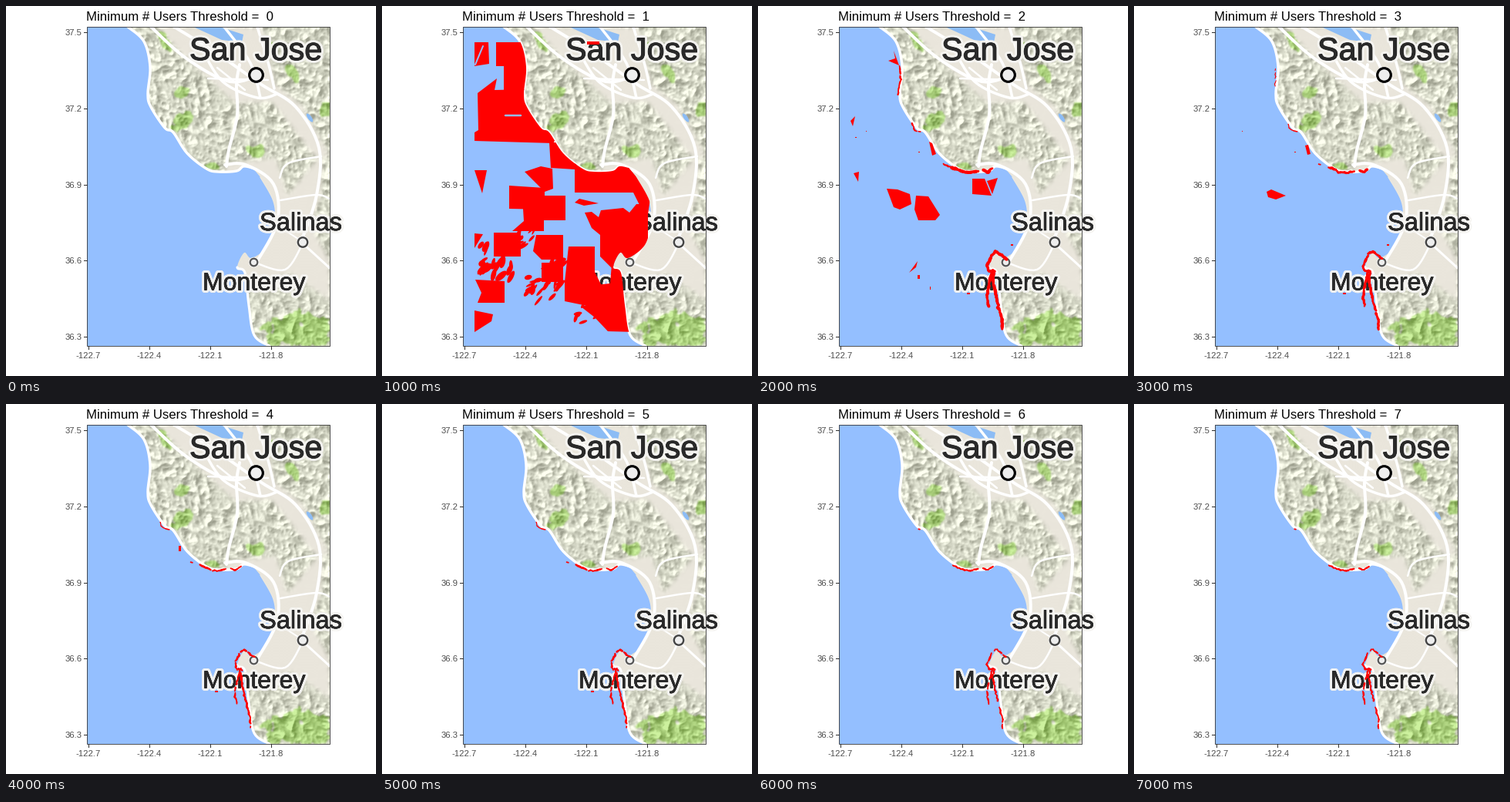
A matplotlib script that plays this animation: 480 px wide and 480 px high, repeating every 8000 ms.

```python
import numpy as np
import matplotlib.pyplot as plt
from matplotlib.animation import FuncAnimation
from matplotlib.patches import Circle, Ellipse, Polygon, Rectangle
from matplotlib.path import Path
from matplotlib.patheffects import Normal, withStroke

SIZE, DPI, STEPS = 480, 100, 8
LEFT, RIGHT, TOP, BOTTOM = 105, 420, 27, 441
W, H = RIGHT - LEFT, BOTTOM - TOP
PX = 72 / DPI
SEA, BAY, RED, FONT = "#94bfff", "#8cbcf5", "#ff0000", "Liberation Sans"

rng = np.random.default_rng(11)
fig = plt.figure(figsize=(SIZE / DPI, SIZE / DPI), dpi=DPI, facecolor="white")
ax = fig.add_axes([0, 0, 1, 1])
ax.axis("off")
panel = Rectangle((LEFT, TOP), W, H, fc="none", ec="none")
ax.add_patch(panel)


def put(artist, clip=panel):
    ax.add_artist(artist)
    artist.set_clip_path(clip)
    return artist


def fill(points, color, z=2, clip=panel):
    return put(Polygon(points, fc=color, ec="none", zorder=z), clip)


def stroke(points, width, color="white", z=3):
    line, = ax.plot(*np.transpose(points), color=color, lw=width * PX, zorder=z,
                    solid_capstyle="round", solid_joinstyle="round")
    line.set_clip_path(panel)
    return line


def curve(*points):
    """Catmull-Rom curve through the points."""
    p = np.array([points[0], *points, points[-1]], float)
    t = np.linspace(0, 1, 9)[:, None]
    parts = [b + t * (c - a) / 2 + t ** 2 * (a - 2.5 * b + 2 * c - d / 2)
             + t ** 3 * (1.5 * (b - c) + (d - a) / 2)
             for a, b, c, d in zip(p, p[1:], p[2:], p[3:])]
    return np.concatenate(parts)


# Terrain
gx, gy = np.meshgrid(np.arange(W) + LEFT + .5, np.arange(H) + TOP + .5)
fx, fy = np.meshgrid(np.fft.fftfreq(W), np.fft.fftfreq(H))


def smooth(field, radius):
    kernel = np.exp(-2 * (np.pi * radius) ** 2 * (fx ** 2 + fy ** 2))
    return np.fft.ifft2(np.fft.fft2(field) * kernel).real


def ridges(wavelength):
    along, across = (fx + fy) / 2 ** .5, (fx - fy) / 2 ** .5
    freq = np.hypot(along * 1.5, across * .9) * wavelength
    noise = np.fft.ifft2(np.fft.fft2(rng.normal(size=(H, W)))
                         * np.exp(-((freq - 1) / .55) ** 2)).real
    return -np.abs(noise / noise.std())


def inside(*points):
    cells = np.column_stack([gx.ravel(), gy.ravel()])
    return Path(points).contains_points(cells).reshape(H, W)


def park(x, y, rx, ry, tilt=0):
    u, v = gx - x, gy - y
    return ((u - tilt * v) / rx) ** 2 + (v / ry) ** 2 + rough < 1


dy, dx = np.gradient(9 * ridges(26) + 4 * ridges(13) + 1.4 * ridges(7))
shade = smooth(dx + dy, .45)
shade = np.clip(shade / shade.std(), -2.3, 1.8)[..., None]
rough = smooth(rng.normal(size=(H, W)), 2.5)
rough *= .3 / rough.std()

basin = inside((195, 27), (240, 74), (298, 126), (345, 124), (400, 195), (420, 195),
               (385, 130), (350, 102), (332, 27))
lowland = inside((285, 205), (350, 197), (365, 246), (410, 190), (409, 245), (395, 285),
                 (420, 330), (420, 382), (370, 347), (315, 362), (290, 335))
hill = smooth(1. - (basin | lowland), 3)[..., None]
woods = (park(229, 113, 8, 8) | park(228, 150, 12, 15, -.4) | park(324, 187, 11, 9)
         | park(206, 45, 7, 13, .5) | park(372, 87, 7, 12, .4) | park(415, 134, 7, 9)
         | park(344, 53, 6, 6) | park(268, 208, 9, 4) | park(384, 422, 48, 24))
wood = .85 * smooth(woods * 1., 1)[..., None]
land = np.array([234, 230, 220]) + hill * (np.array([-21, -15, -22]) + shade * 24)
green = np.array([160, 203, 108]) + shade * (6 + 14 * hill)
land = land * (1 - wood) + green * wood
ax.imshow(np.clip(land, 0, 255).astype(np.uint8), extent=(LEFT, RIGHT, BOTTOM, TOP),
          aspect="auto", interpolation="nearest", zorder=1)

# Water
north = curve((158, 27), (179, 46), (187, 79), (184, 114), (188, 131), (206, 158),
              (217, 164), (235, 191), (260, 211), (275, 215), (299, 214), (308, 208),
              (320, 210))
south = curve((330, 222), (347, 253), (349, 280), (341, 310), (319, 327), (309, 320),
              (300, 339), (310, 346), (315, 388), (322, 427), (342, 441))
sea = fill([*north, *south, (LEFT, BOTTOM), (LEFT, TOP)], SEA)
fill([(243, 27), (277, 27), (308, 37), (306, 47), (280, 44)], BAY)
put(Ellipse((394, 145), 5, 13, angle=-35, fc=BAY, zorder=2))

# Roads
stroke(north, 3.4)
stroke(south[:30], 1.5, "#ece8de")
stroke(south[54:], 3.2)


def road(width, *points):
    stroke(curve(*points), width)


road(4, (188, 27), (234, 68), (290, 98), (332, 88))
road(4, (218, 27), (270, 59), (330, 101), (376, 131), (406, 184), (403, 245), (385, 300))
road(4, (286, 208), (289, 187), (300, 142), (299, 102), (303, 76))
road(4, (284, 206), (311, 206), (347, 231), (352, 280), (326, 331))
road(3.5, (253, 54), (281, 98), (326, 119), (352, 114))
road(3.5, (283, 27), (317, 74), (330, 119))
road(3.5, (326, 27), (340, 73), (348, 107))
road(2.5, (262, 94), (340, 96))
road(2.5, (274, 80), (310, 109))
road(2.5, (355, 223), (366, 204), (409, 195))
road(2.5, (356, 252), (402, 245), (420, 250))
road(3, (385, 308), (420, 340))
road(2.5, (323, 333), (362, 342), (385, 308))
road(2, (351, 284), (385, 306))


# Places
def place(x, y, name, size, weight):
    put(ax.text(x, y, name, fontsize=size * PX, family=FONT, color="#292929", zorder=5,
                path_effects=[withStroke(linewidth=5, foreground="#f6f5f2", alpha=.8),
                              withStroke(linewidth=weight, foreground="#292929"),
                              Normal()]))


def town(x, y, radius, width, color):
    put(Circle((x, y), radius + 2, fc="white", ec="none", alpha=.8, zorder=5))
    put(Circle((x, y), radius, fc="#eeeeee", ec=color, lw=width * PX, zorder=5))


place(238, 70, "San Jose", 41.3, .8)
place(329, 291, "Salinas", 32.6, .4)
place(255, 368.5, "Monterey", 32, .4)
town(324.5, 89.5, 8.8, 3.2, "black")
town(385, 306.5, 6.2, 2.4, "#444444")
town(321.5, 332.5, 4.8, 2.2, "#555555")

# Red areas, each visible from threshold lo to hi
layers = []


def area(lo, hi, *points, clip=panel):
    layers.append((lo, hi, fill(points, RED, 7, clip)))


def box(lo, hi, x0, y0, x1, y1, clip=panel):
    area(lo, hi, (x0, y0), (x1, y0), (x1, y1), (x0, y1), clip=clip)


def specks(count, x0, y0, x1, y1, size, angle=-45):
    for _ in range(count):
        spot = Ellipse((rng.uniform(x0, x1), rng.uniform(y0, y1)),
                       size * rng.uniform(.7, 1.6), size * rng.uniform(.25, .6),
                       angle=angle + rng.uniform(-35, 35), fc=RED, ec="none", zorder=7)
        layers.append((1, 1, put(spot)))


def trace(lo, hi, width, points, gap=.1):
    """Ragged line along the shore; gap is the share of dropped pieces."""
    points = np.array(points, float)
    reach = np.r_[0, np.cumsum(np.hypot(*np.diff(points, axis=0).T))]
    at = np.arange(0, reach[-1], 2.5)
    track = np.column_stack([np.interp(at, reach, points[:, i]) for i in (0, 1)])
    track += rng.normal(0, .4, track.shape)
    for pair in zip(track[:-1], track[1:]):
        if rng.random() >= gap:
            piece = stroke(pair, width * rng.uniform(.75, 1.25), RED, 7)
            layers.append((lo, hi, piece))


# Threshold 1, blocks reaching the coast
box(1, 1, 148, 47, 190, 78, sea)
box(1, 1, 158, 78, 190, 109, sea)
area(1, 1, (120, 175), (120, 164), (125, 161), (124, 113), (149, 94), (146, 109),
     (190, 108), (230, 165), (222, 178), clip=sea)
layers.append((1, 1, stroke([(160, 141.5), (180, 141.5)], 2.5, SEA, 8)))
area(1, 1, (217, 177), (230, 177), (255, 200), (250, 212), (219, 210), clip=sea)
box(1, 1, 250, 200, 329, 242, sea)
area(1, 1, (319, 205), (355, 205), (345, 270), (339, 268), (326, 242), clip=sea)
area(1, 1, (263, 268), (272, 267), (281, 274), (284, 265), (313, 262), (321, 268),
     (330, 257), (345, 257), (345, 330), (298, 340), (283, 325), (283, 297), (272, 288),
     clip=sea)
area(1, 1, (276, 362), (296, 360), (298, 335), (330, 345), (330, 423), (293, 422),
     (276, 404), (258, 390), (276, 385), clip=sea)

# Threshold 1, open water
area(1, 1, (120, 47), (138, 47), (139, 75), (120, 78))
layers.append((1, 1, stroke([(131, 52), (121, 76)], 2, SEA, 8)))
box(1, 1, 266, 46, 282, 50)
area(1, 1, (120, 213), (136, 213), (130, 243))
area(1, 1, (185, 215), (206, 208), (221, 211), (222, 237), (211, 241))
area(1, 1, (165, 233), (211, 236), (211, 264), (165, 263))
box(1, 1, 203, 246, 238, 278)
area(1, 1, (183, 263), (210, 262), (210, 292), (169, 292), (184, 279))
area(1, 1, (250, 255), (256, 250), (281, 256), (262, 259))
box(1, 1, 145, 294, 180, 325)
area(1, 1, (200, 297), (235, 297), (235, 329), (207, 329), (196, 318))
area(1, 1, (120, 295), (131, 296), (120, 314))
area(1, 1, (242, 312), (276, 312), (276, 345), (284, 361), (276, 391), (237, 383),
     (237, 358))
area(1, 1, (121, 355), (159, 357), (159, 385), (124, 385), (129, 372))
area(1, 1, (120, 395), (144, 400), (142, 409), (120, 423))
box(1, 1, 207, 333, 235, 358)
specks(11, 124, 302, 140, 348, 13, -55)
specks(9, 138, 330, 168, 352, 15, -60)
specks(28, 187, 330, 235, 386, 12)
specks(12, 168, 285, 205, 312, 9)
specks(10, 250, 386, 288, 412, 8)

# Threshold 2
area(2, 2, (120, 149), (126, 143), (123, 156))
area(2, 2, (124, 217), (131, 215), (130, 228))
area(2, 2, (167, 237), (181, 238), (197, 244), (199, 257), (184, 264), (176, 261))
area(2, 2, (205, 246), (221, 247), (236, 271), (230, 278), (208, 278), (203, 264))
area(2, 2, (278, 224), (294, 224), (303, 246), (278, 244))
area(2, 2, (297, 227), (311, 223), (304, 244))
area(2, 2, (169, 71), (178, 68), (176, 58), (183, 77))
area(2, 2, (222, 176), (226, 178), (231, 192), (226, 194))
area(2, 2, (207, 331), (205, 339), (196, 346))
box(2, 2, 207, 349, 210, 354)
box(2, 2, 223, 364, 224, 368)
box(2, 2, 126, 170, 128, 171)
trace(2, 2, 2, [(184, 78), (185, 96), (181, 117)])
trace(2, 2, 2, [(200, 152), (203, 161), (212, 163)])
trace(2, 2, 2.2, [(240, 205), (257, 213)])

# Thresholds 3 to 7
area(3, 3, (172, 241), (178, 238), (197, 246), (184, 251), (174, 248))
area(3, 3, (222, 181), (226, 180), (229, 192), (225, 193))
box(4, 4, 224, 184, 227, 191)
box(2, 3, 139.5, 162, 141, 163)
box(2, 3, 208, 189, 209.5, 190)
box(2, 3, 328, 309, 331, 311)
box(2, 5, 271, 372, 275, 374)
trace(3, 3, 1, [(184, 79), (183, 106)], .3)
trace(3, 5, 1.5, [(200, 153), (203, 161), (213, 163)], .3)
trace(6, 7, 1.6, [(208, 162), (215, 163)])
trace(3, 5, 1.6, [(240, 205), (243, 206)])

# Shore strips that thin out as the threshold grows
beach = [(252, 209), (268, 216), (278, 216), (286, 214)]
cove = [(292, 213), (298, 216), (306, 209)]
point = [(322, 328), (309, 318), (304, 322), (297, 337), (299, 344), (307, 344),
         (304, 353), (311, 386), (317, 408), (317, 421)]
outer = [(304, 343), (298, 368), (297, 379), (300, 391)]
for lo, hi, width, gap in ((2, 2, 3.6, .02), (3, 3, 3, .05), (4, 5, 2.3, .12),
                           (6, 7, 2.1, .17)):
    for strip in (beach, cove, point, outer):
        trace(lo, hi, width, strip, gap)
trace(2, 4, 2, [(302, 346), (306, 357), (309, 382)])

# Frame, axes and title
ax.add_patch(Rectangle((LEFT, TOP), W, H, fc="none", ec="#333333", lw=.6, zorder=9))
label = dict(family=FONT, fontsize=11.2 * PX, color="#4d4d4d")
for i in range(5):
    y = 34 + 98.8 * i
    ax.plot([LEFT - 4, LEFT], [y, y], color="#333333", lw=.75)
    ax.text(98.5, y + 4, f"{37.5 - .3 * i:.1f}", ha="right", **label)
for i in range(4):
    x = 106.8 + 78.9 * i
    ax.plot([x, x], [BOTTOM, BOTTOM + 4], color="#333333", lw=.75)
    ax.text(x, 457, f"-{122.7 - .3 * i:.1f}", ha="center", **label)
title = ax.text(104.5, 19, "", family=FONT, fontsize=16.8 * PX, color="black")
ax.set_xlim(0, SIZE)
ax.set_ylim(SIZE, 0)


def update(step):
    title.set_text(f"Minimum # Users Threshold =  {step}")
    for lo, hi, artist in layers:
        artist.set_visible(lo <= step <= hi)


anim = FuncAnimation(fig, update, frames=STEPS, init_func=lambda: update(0),
                     interval=1000, repeat=True, repeat_delay=0)
plt.show()
```
